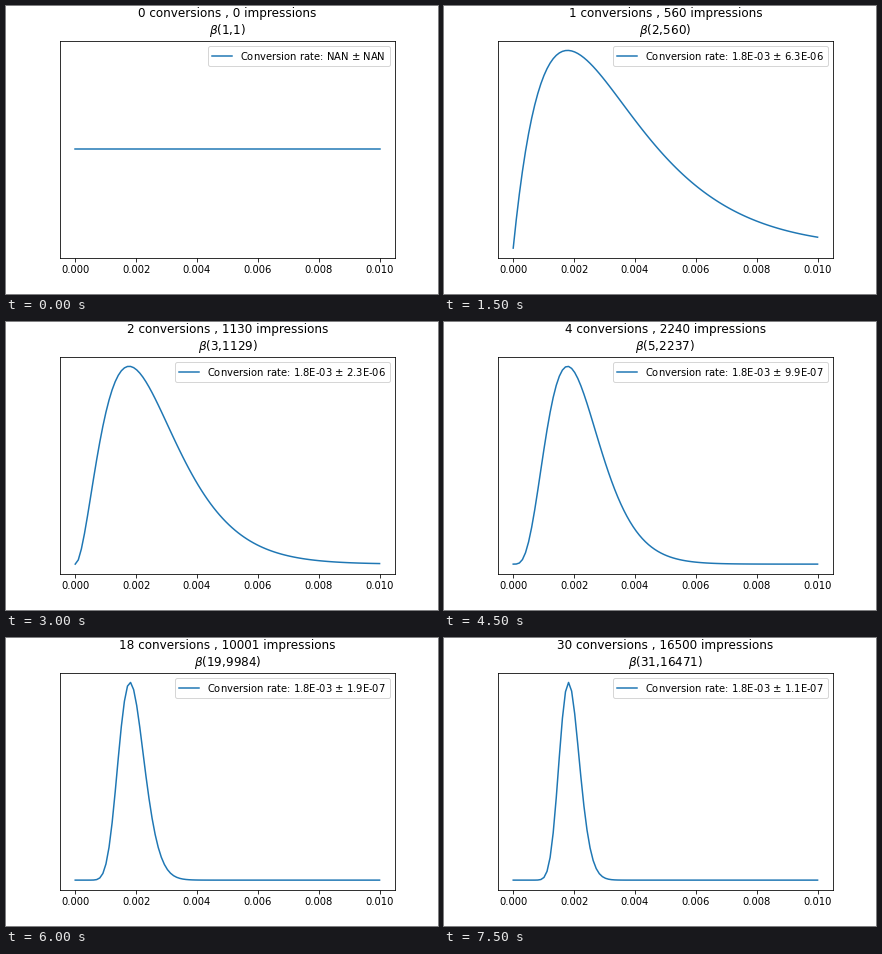
Recreate the animation shown at these times as a matplotlib script. Size 432x288 px, loop 9 s.

```python
import numpy as np
import matplotlib.pyplot as plt
from matplotlib.animation import FuncAnimation

TRIALS = [(0, 0), (1, 560), (2, 1130), (4, 2240), (18, 10001), (30, 16500)]
RATES = np.linspace(0, 0.01, 100)

fig, ax = plt.subplots(figsize=(6, 4), dpi=72)
fig.subplots_adjust(bottom=0.125)


def summary(hits, shown, a, b):
    """Legend text: observed rate and posterior variance."""
    if shown:
        mean = hits / shown
        var = a * b / ((a + b) ** 2 * (a + b + 1))
    else:
        mean = var = float("nan")
    return rf"Conversion rate: {mean:.1E} $\pm$ {var:.1E}"


def draw(i):
    hits, shown = TRIALS[i]
    a, b = hits + 1, shown - hits + 1
    density = RATES ** (a - 1) * (1 - RATES) ** (b - 1)

    ax.clear()
    ax.plot(RATES, density / density.max(), label=summary(hits, shown, a, b))
    ax.set_yticks([])
    ax.set_title(f"{hits} conversions , {shown} impressions\n"
                 rf"$\beta$({a},{b})", pad=7, linespacing=1.1)
    ax.legend(loc="upper right")
    return ax.get_children()


anim = FuncAnimation(fig, draw, frames=len(TRIALS), interval=1500,
                     repeat=True, repeat_delay=0)
plt.show()
```
